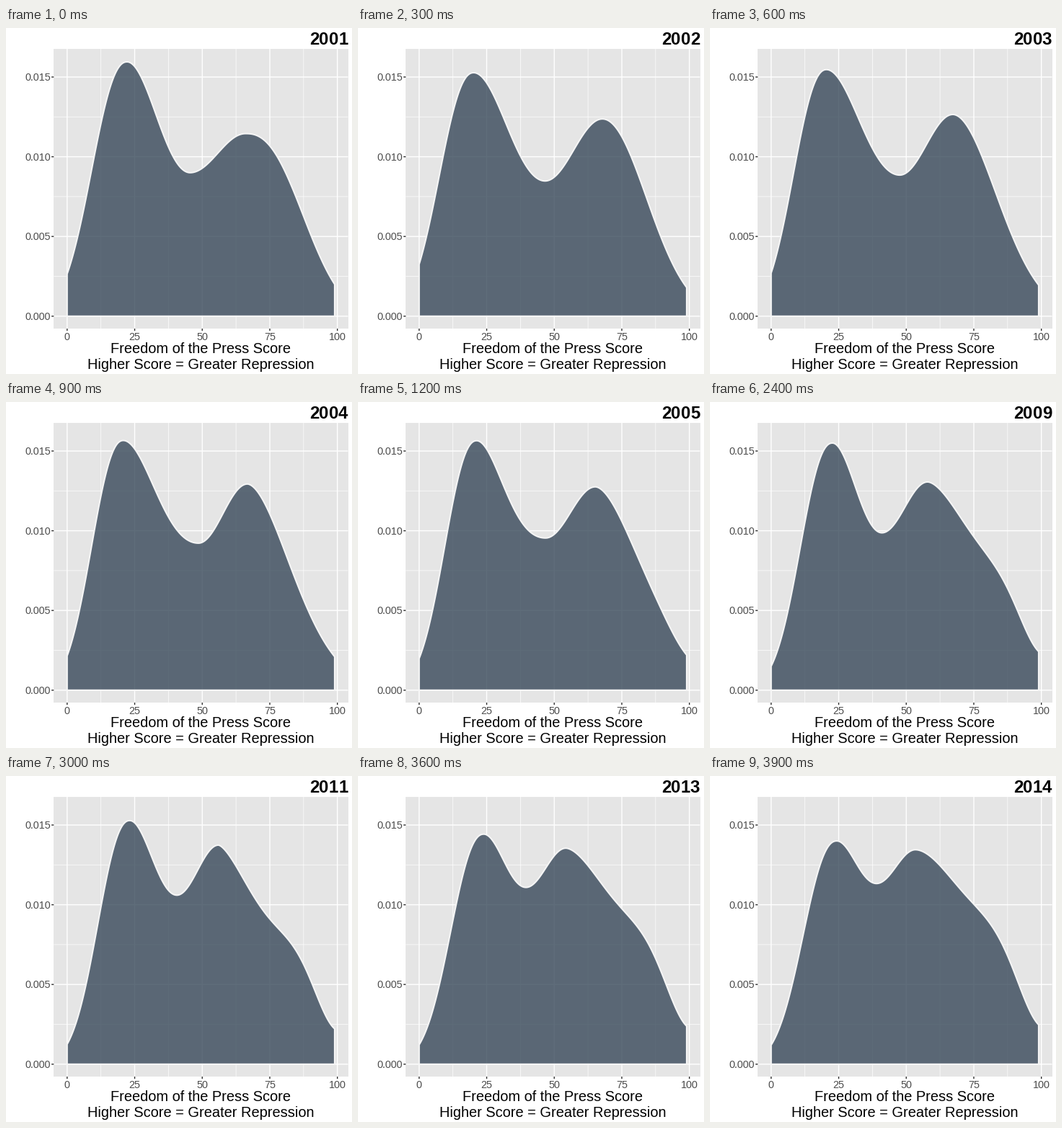
Animation, 480 px wide and 480 px high, one loop 4.2 s. Source, as a matplotlib script:

```python
import numpy as np
import matplotlib.pyplot as plt
from matplotlib.animation import FuncAnimation
from matplotlib.patches import Polygon, Rectangle

plt.rcParams["font.family"] = "Liberation Sans"
PX = 0.72  # points per pixel at 100 dpi
FIRST_YEAR, YEARS = 2001, 14
LAST_SCORE = 99

# Turning points of the curve (densities in thousandths):
# start, first peak (x, y), trough (x, y), second peak (x, y), end, tail power
KEY_POSES = {
    2001: (2.65, 22.2, 15.95, 45.5, 9.0, 66.0, 11.45, 2.0, 2.48),
    2002: (3.25, 20.2, 15.27, 46.6, 8.48, 67.8, 12.37, 1.8, 2.06),
    2004: (2.15, 20.8, 15.66, 48.6, 9.22, 66.7, 12.93, 2.1, 1.8),
    2007: (1.65, 22.3, 15.62, 43.2, 10.19, 62.2, 12.4, 2.42, 1.8),
    2009: (1.5, 22.7, 15.5, 41.0, 9.87, 57.9, 13.06, 2.42, 1.73),
    2011: (1.25, 23.2, 15.28, 40.6, 10.6, 56.0, 13.74, 2.22, 1.52),
    2014: (1.2, 24.3, 14.0, 39.0, 11.33, 53.4, 13.45, 2.47, 1.87),
}


def to_x(score):
    return 84.8 + 3.749 * score


def to_y(thousandths):
    return 399.8 - 22.12 * thousandths


def ease(a, b, t):
    return a + (b - a) * (1 - np.cos(np.pi * t)) / 2


def flank(peak, end, t, power):
    """Bell-like fall from peak (t = 0) to end (t = 1)."""
    return peak * (end / peak) ** (t ** power)


def density(year, score):
    pose = [np.interp(year, list(KEY_POSES), column)
            for column in zip(*KEY_POSES.values())]
    start, x1, peak1, x2, trough, x3, peak2, end, power = pose
    lean = 0.1 + 0.28 * np.exp(-((year - 2005.5) / 2) ** 2)
    shoulder = 2 * np.clip((year - 2004) / 7, 0, 1)

    rise, fall, climb, tail = (
        np.clip((score - a) / (b - a), 0, 1)
        for a, b in ((0, x1), (x1, x2), (x2, x3), (x3, LAST_SCORE)))
    fall = fall + lean * fall * (1 - fall)
    bump = shoulder * np.sin(np.pi * tail ** 1.7) ** 2
    return np.select(
        [score < x1, score < x2, score < x3],
        [flank(peak1, start, 1 - rise, 2.25),
         ease(peak1, trough, fall),
         ease(trough, peak2, climb)],
        flank(peak2, end, tail, power) + bump)


def outline(year):
    score = np.linspace(0, LAST_SCORE, 300)
    curve = np.column_stack([to_x(score), to_y(density(year, score))])
    base = [[to_x(LAST_SCORE), to_y(0)], [to_x(0), to_y(0)]]
    return np.vstack([curve, base])


fig = plt.figure(figsize=(4.8, 4.8), dpi=100, facecolor="white")
ax = fig.add_axes([0, 0, 1, 1])
ax.set_xlim(0, 480)
ax.set_ylim(480, 0)
ax.axis("off")

LEFT, TOP, RIGHT, BOTTOM = 66.3, 29, 474.5, 417


def line(xs, ys, color, width, z):
    ax.plot(xs, ys, color=color, lw=width * PX, zorder=z,
            solid_capstyle="butt", snap=False)


def label(x, y, text, size, color="black", ha="center", **style):
    return ax.text(x, y, text, fontsize=size * PX, color=color, ha=ha,
                   va="baseline", zorder=6, **style)


ax.add_patch(Rectangle((LEFT, TOP), RIGHT - LEFT, BOTTOM - TOP, fc="#e5e5e5", lw=0))

for score in np.arange(0, 101, 12.5):
    major = score % 25 == 0
    x = to_x(score)
    line([x, x], [TOP, BOTTOM], "white", 1.4 if major else 0.7, 2 if major else 1)
    if major:
        line([x, x], [BOTTOM, BOTTOM + 3.2], "#333333", 1.4, 2)
        label(x, 433, f"{score:.0f}", 14.4, "#4d4d4d")

for value in np.arange(0, 15.1, 2.5):
    major = value % 5 == 0
    y = to_y(value)
    line([LEFT, RIGHT], [y, y], "white", 1.4 if major else 0.7, 2 if major else 1)
    if major:
        line([LEFT - 3.2, LEFT], [y, y], "#333333", 1.4, 2)
        label(62.3, y + 5, f"{value / 1000:.3f}", 14.4, "#4d4d4d", "right")

label(270.3, 451, "Freedom of the Press Score", 20)
label(270.3, 473, "Higher Score = Greater Repression", 20)

# One text per digit keeps the figures evenly spaced, without kerning.
DIGIT = 24 * 0.556
digits = [label(474.3 - DIGIT * (3.5 - i), 23, "", 24, weight="bold") for i in range(4)]

area = ax.add_patch(Polygon(outline(FIRST_YEAR), fc="#374859", alpha=0.8, lw=0, zorder=3))
edge = ax.add_patch(Polygon(outline(FIRST_YEAR), fc="none", ec="#f5f5f5", lw=2.1 * PX,
                            joinstyle="round", zorder=4))


def draw(i):
    year = FIRST_YEAR + i
    shape = outline(year)
    area.set_xy(shape)
    edge.set_xy(shape)
    for text, digit in zip(digits, str(year)):
        text.set_text(digit)
    return area, edge, *digits


anim = FuncAnimation(fig, draw, frames=YEARS, interval=300, repeat=True, repeat_delay=0)
plt.show()
```
